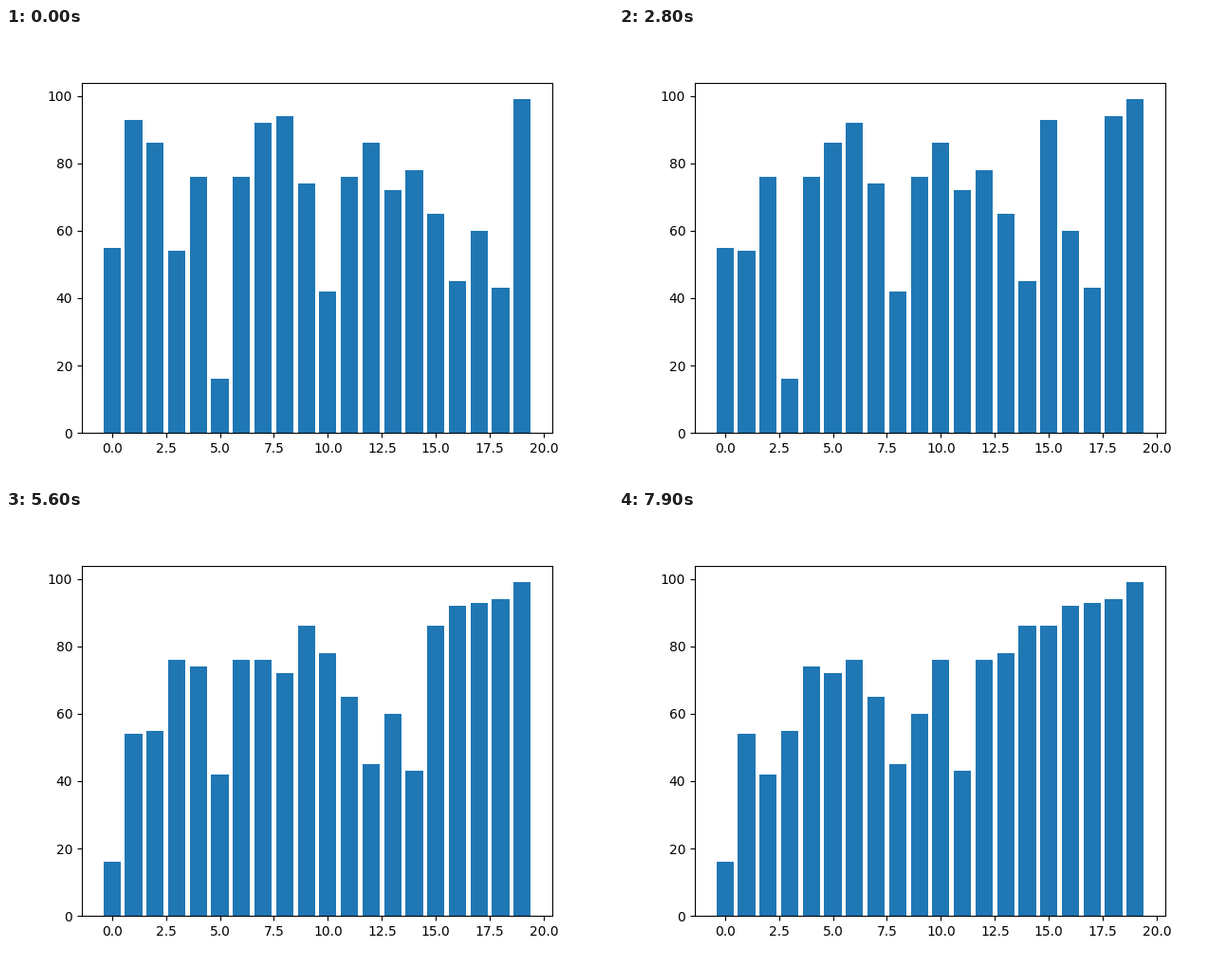
Recreate the animation shown at these times as a matplotlib script. Size 640 by 480 pixels, loop 8000 ms.

```python
import matplotlib.pyplot as plt
from matplotlib.animation import FuncAnimation

FRAMES = 80
INTERVAL = 100  # ms

# Unsorted input; every later pose follows from the sort.
start = [55, 93, 86, 54, 76, 16, 76, 92, 94, 74,
         42, 76, 86, 72, 78, 65, 45, 60, 43, 99]


def bubble_sort(values):
    """Yield the list before sorting and after every swap."""
    a = list(values)
    yield a[:]
    for end in range(len(a) - 1, 0, -1):
        for j in range(end):
            if a[j] > a[j + 1]:
                a[j], a[j + 1] = a[j + 1], a[j]
                yield a[:]


states = list(bubble_sort(start))

fig, ax = plt.subplots(figsize=(6.4, 4.8), dpi=100)
bars = ax.bar(range(len(start)), start)


def update(frame):
    for bar, height in zip(bars, states[frame]):
        bar.set_height(height)
    return bars.patches


anim = FuncAnimation(fig, update, frames=FRAMES, interval=INTERVAL,
                     init_func=lambda: update(0), repeat=True, repeat_delay=0)
plt.show()
```
